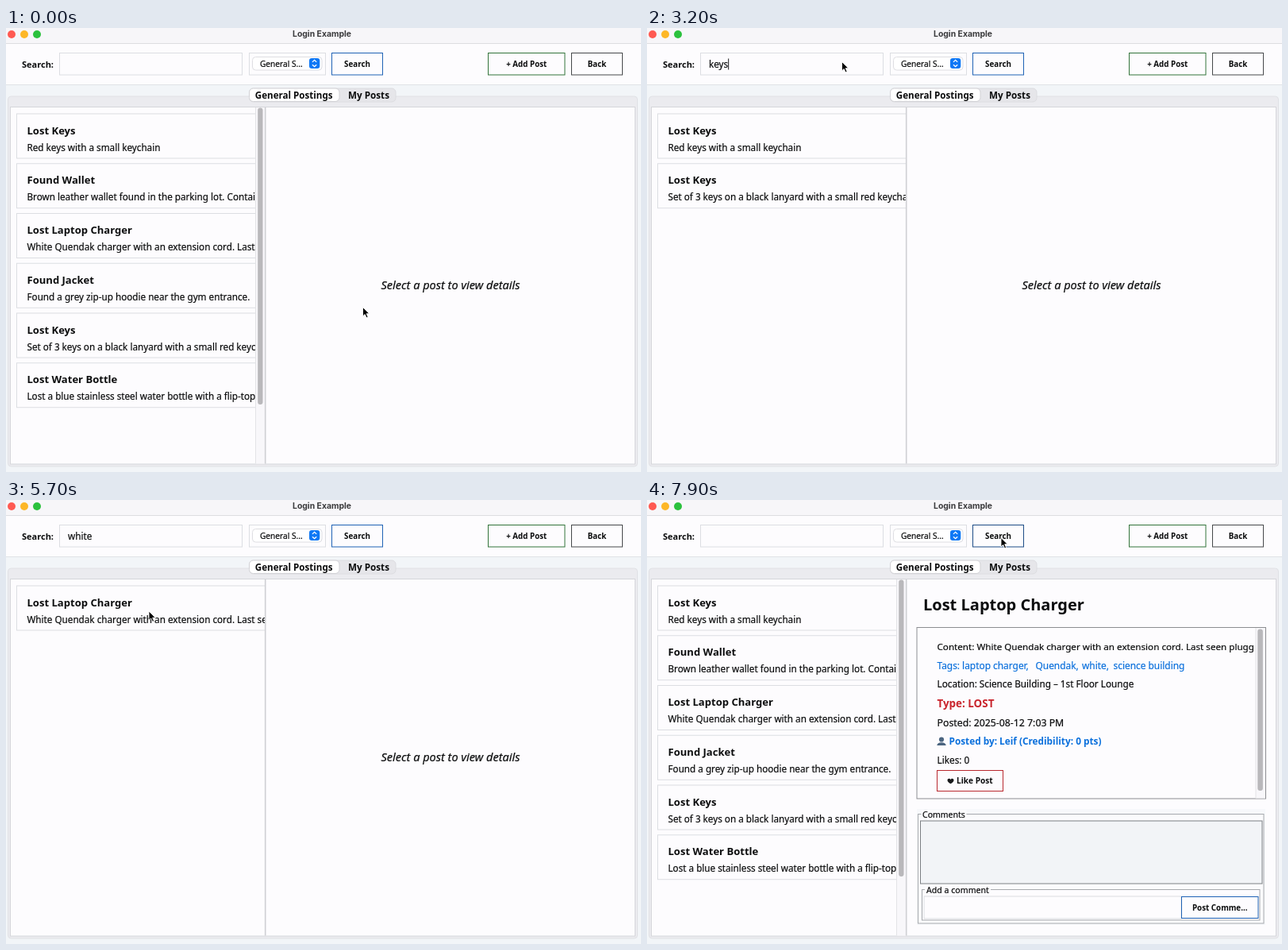
Animation, 800 px wide and 559 px high, one loop 8 s. Source, as an HTML page:

```html
<!DOCTYPE html>
<html lang="en">
<head>
<meta charset="utf-8">
<title>Login Example</title>
<style>
  html, body { margin: 0; width: 100%; height: 100%; overflow: hidden; background: #f2f5f8; }
  svg { display: block; }
  text {
    font-family: "Noto Sans", "Open Sans", sans-serif;
    color: #0c0d0e; fill: currentColor; stroke: currentColor; stroke-width: .2px;
  }
  .b { font-weight: 700; stroke: none; }
  .mid { text-anchor: middle; }
</style>
</head>
<body>
<svg id="stage" width="800" height="559" viewBox="0 0 800 559"></svg>
<script>
const WHITE = '#fdfcfe', LINE = '#dcdee2', BLUE = '#1f62b5', LINK = '#0b70dc';

const box = (x, y, w, h, fill, stroke = 'none', extra = '') =>
  `<rect x="${x}" y="${y}" width="${w}" height="${h}" fill="${fill}" stroke="${stroke}" ${extra}/>`;
const label = (x, y, size, str, cls = '', extra = '') =>
  `<text x="${x}" y="${y}" font-size="${size}" class="${cls}" ${extra}>${str}</text>`;
const line = (d, color, width = 1) =>
  `<path d="${d}" fill="none" stroke="${color}" stroke-width="${width}"/>`;
const button = (x, y, w, h, color, str, id = '') =>
  box(x, y, w, h, WHITE, color, id && `id="${id}"`) +
  label(x + w / 2, y + h / 2 + 3.6, 9.8, str, 'b mid');

const POSTS = [
  ['Lost Keys', 'Red keys with a small keychain'],
  ['Found Wallet', 'Brown leather wallet found in the parking lot. Contains a student card'],
  ['Lost Laptop Charger', 'White Quendak charger with an extension cord. Last seen plugged in'],
  ['Found Jacket', 'Found a grey zip-up hoodie near the gym entrance.'],
  ['Lost Keys', 'Set of 3 keys on a black lanyard with a small red keychain'],
  ['Lost Water Bottle', 'Lost a blue stainless steel water bottle with a flip-top lid']
];

const card = ([title, body], i) => {
  const y = 62.75 * i;
  return box(13.5, y + 108, 400, 56, WHITE, LINE) +
    label(26.5, y + 133.5, 13.05, title, 'b') +
    label(26.5, y + 154.5, 11.7, body);
};

const postList = (id, width, picks) =>
  `<svg id="${id}" width="${width}" height="548">${picks.map((p, i) => card(POSTS[p], i)).join('')}</svg>`;

const titleBar = () =>
  box(0, 0, 800, 19.5, '#f7f6f9') + line('M0 19.5H800', '#dddde0') +
  ['#ff5a52', '#fdb727', '#2bc13d'].map((c, i) => `<circle cx="${7 + 16 * i}" cy="8" r="5" fill="${c}"/>`).join('') +
  label(398, 11.3, 10.4, 'Login Example', 'b mid', 'style="font-family:Inter,sans-serif;color:#3b3b3d"');

const toolbar = () =>
  box(0, 20, 800, 51.5, WHITE) + line('M0 71.5H800', '#e0e2e6') +
  label(20, 49.5, 11, 'Search:', 'b') +
  box(67.5, 31.5, 230, 27.5, WHITE, LINE) +
  box(306.5, 31.5, 96, 27.5, WHITE, LINE) +
  box(310.5, 36.5, 87.5, 16.5, '#fff', '#dedee2', 'rx="4"') +
  label(320, 48.5, 10.15, 'General S...') +
  box(382, 38, 13.3, 13, '#0f78f5', 'none', 'rx="3.2"') +
  line('M386 42.9l2.6-2.5 2.6 2.5M386 46.2l2.6 2.5 2.6-2.5', '#fff', 1.3) +
  button(410.5, 31.5, 64, 27.5, BLUE, 'Search', 'searchButton') +
  button(607.5, 31.5, 96.5, 27.5, '#32743a', '+ Add Post') +
  button(712.5, 31.5, 64, 27.5, '#46484b', 'Back');

const tabs = () =>
  box(2.5, 86, 793, 466, '#ebebef', '#e0e1e5', 'rx="4"') +
  box(5.5, 99.5, 787, 449.5, WHITE, '#d5d6da') +
  box(306.5, 76, 184.5, 17, '#e6e6ea', '#dcdce0', 'rx="5"') +
  box(306.5, 76, 113.5, 16.5, '#fff', '#d2d2d6', 'rx="5"') +
  label(362.7, 88.5, 11.6, 'General Postings', 'b mid') +
  label(457, 88.5, 11.7, 'My Posts', 'b mid');

const scrollbar = () =>
  '<g id="scrollbar">' + box(314.5, 100, 11.5, 448.5, '#f8f7fa') + line('M314.5 100V548.5', '#e3e3e6') +
  box(317.2, 100.5, 6.3, 373.5, '#b9b8bb', 'none', 'rx="3"') + '</g>';

const commentArea = () =>
  box(340, 389, 439, 146, '#f7f8fb') +
  box(341.5, 395.5, 435.5, 137.5, '#fbfbfd', '#a6a9ad') +
  box(345.5, 390, 57, 10, '#fbfbfd') + label(347, 400, 10.5, 'Comments') +
  box(344.5, 404, 430.5, 79, '#f2f4f7', '#7d8084') +
  box(346.5, 490.5, 425.5, 38.5, WHITE, '#a6a9ad') +
  box(350, 486, 83, 10, WHITE) + label(352, 495, 10.6, 'Add a comment') +
  box(349, 499, 324, 28, WHITE, LINE) +
  button(673.5, 499.5, 96.5, 27, BLUE, 'Post Comme...');

const details = () => {
  const blue = `style="color:${LINK}"`;
  const tags = [[365.5, 'Tags: laptop charger,'], [489.5, 'Quendak,'], [548, 'white,'], [587.5, 'science building']];
  return '<g id="details">' + box(329, 101, 462, 446, WHITE) +
    label(348, 139, 20, 'Lost Laptop Charger', 'b') +
    box(340, 160.5, 439.5, 215.5, WHITE, '#8c8d91') +
    label(365.5, 189, 11.65, 'Content: White Quendak charger with an extension cord. Last seen plugg') +
    tags.map(([x, s]) => label(x, 212.5, 11.9, s, '', blue)).join('') +
    label(365.5, 235.5, 11.75, 'Location: Science Building – 1st Floor Lounge') +
    label(365.5, 260.5, 13.4, 'Type: LOST', 'b', 'style="color:#c9252d"') +
    label(365.5, 284.5, 12.3, 'Posted: 2025-08-12 7:03 PM') +
    '<circle cx="371" cy="301.5" r="3.1" fill="#4c6580"/><path d="M365.3 309q.4-3.8 5.7-3.8t5.7 3.8z" fill="#4c6580"/>' +
    label(380.5, 308, 11.8, 'Posted by: Leif (Credibility: 0 pts)', 'b', blue) +
    label(365.5, 331.5, 11.8, 'Likes: 0') +
    box(365.5, 340.5, 83, 26, WHITE, '#b9292f') +
    '<path d="M382.5 357.3c-2.6-1.6-4-3-4-4.6 0-2.3 3-2.8 4-.8 1-2 4-1.5 4 .8 0 1.6-1.4 3-4 4.6z" fill="#18191b"/>' +
    label(390, 357, 10.1, 'Like Post', 'b') +
    box(767, 161, 12, 214.5, '#f8f7fa') + line('M767 161V375.5', '#e3e3e6') +
    box(769.3, 162.5, 6.6, 203.5, '#b9b8bb', 'none', 'rx="3.2"') +
    commentArea() + '</g>';
};

document.getElementById('stage').innerHTML =
  box(0, 0, 800, 559, '#f2f5f8') + titleBar() + toolbar() + tabs() +
  postList('all', 314, [0, 1, 2, 3, 4, 5]) + postList('keys', 326, [0, 4]) + postList('white', 326, [2]) +
  scrollbar() + line('M326.7 100V548.5', '#cfd0d3', 1.6) +
  label(560, 329, 14.5, 'Select a post to view details', 'mid', 'id="hint" font-style="italic"') +
  details() +
  label(78, 49.5, 11.7, '', '', 'id="query"') +
  '<rect id="caret" y="38.5" width="1" height="14" fill="#18191b"/>' +
  '<path id="pointer" d="M0 0V11.4L2.7 9 4.6 13.3 6.6 12.4 4.7 8.2H8.3Z" fill="#000" stroke="#fff" stroke-width=".9"/>';

const LOOP = 8000;
const el = id => document.getElementById(id);
const show = (id, on) => el(id).setAttribute('visibility', on ? 'visible' : 'hidden');
const latest = (steps, t) => steps.filter(s => s[0] <= t).pop();

// time, x, y
const PATH = [
  [0, 449.5, 351.5], [150, 449.5, 351.5], [850, 238, 43.5], [2000, 238, 43.5], [2500, 452.5, 41.5],
  [2750, 452.5, 41.5], [3100, 245.5, 42.5], [4500, 245.5, 42.5], [4900, 461.5, 45.5], [5150, 461.5, 45.5],
  [5550, 180, 140], [5850, 180, 140], [6250, 240, 33.5], [6450, 238, 42], [7150, 238, 42],
  [7600, 446, 47.5], [8000, 446, 47.5]
];
const EDITS = [
  [0, ''], [1200, 'k'], [1400, 'ke'], [1700, 'key'], [1800, 'keys'],
  [3800, 'key'], [3900, 'ke'], [4000, ''],
  [4200, 'w'], [4300, 'wh'], [4500, 'whi'], [4600, 'whit'], [4700, 'white'],
  [6700, 'whit'], [6800, 'whi'], [6900, 'wh'], [7000, 'w'], [7100, '']
];
const RESULTS = [[0, 'all'], [2700, 'keys'], [5200, 'white'], [7800, 'all']];
const FOCUS = [[950, 2500], [3100, 4900], [6450, 7600]];
const PRESSES = [[2500, 2750], [4900, 5150], [7600, 8000]];

function pointerAt(t) {
  const i = Math.max(1, PATH.findIndex(p => p[0] > t));
  const [t0, x0, y0] = PATH[i - 1], [t1, x1, y1] = PATH[i];
  const u = (t - t0) / (t1 - t0), e = u * u * (3 - 2 * u);
  return [x0 + (x1 - x0) * e, y0 + (y1 - y0) * e];
}

function render(t) {
  const result = latest(RESULTS, t)[1];
  for (const id of ['all', 'keys', 'white']) show(id, id === result);
  show('scrollbar', result === 'all');
  show('details', t >= 5800);
  show('hint', t < 5800);

  const [editTime, query] = latest(EDITS, t);
  el('query').textContent = query;
  const focus = FOCUS.find(([a, b]) => t >= a && t < b);
  const idle = focus ? t - Math.max(editTime, focus[0]) : 0;
  show('caret', focus && idle % 1000 < 500);
  el('caret').setAttribute('x', 78 + (query ? el('query').getComputedTextLength() : 0));

  const pressed = PRESSES.some(([a, b]) => t >= a && t < b);
  el('searchButton').setAttribute('stroke', pressed ? '#1d4c86' : BLUE);
  el('pointer').setAttribute('transform', `translate(${pointerAt(t)})`);
}

const start = performance.now();
function frame() {
  render((performance.now() - start) % LOOP);
  requestAnimationFrame(frame);
}
frame();
</script>
</body>
</html>
```
